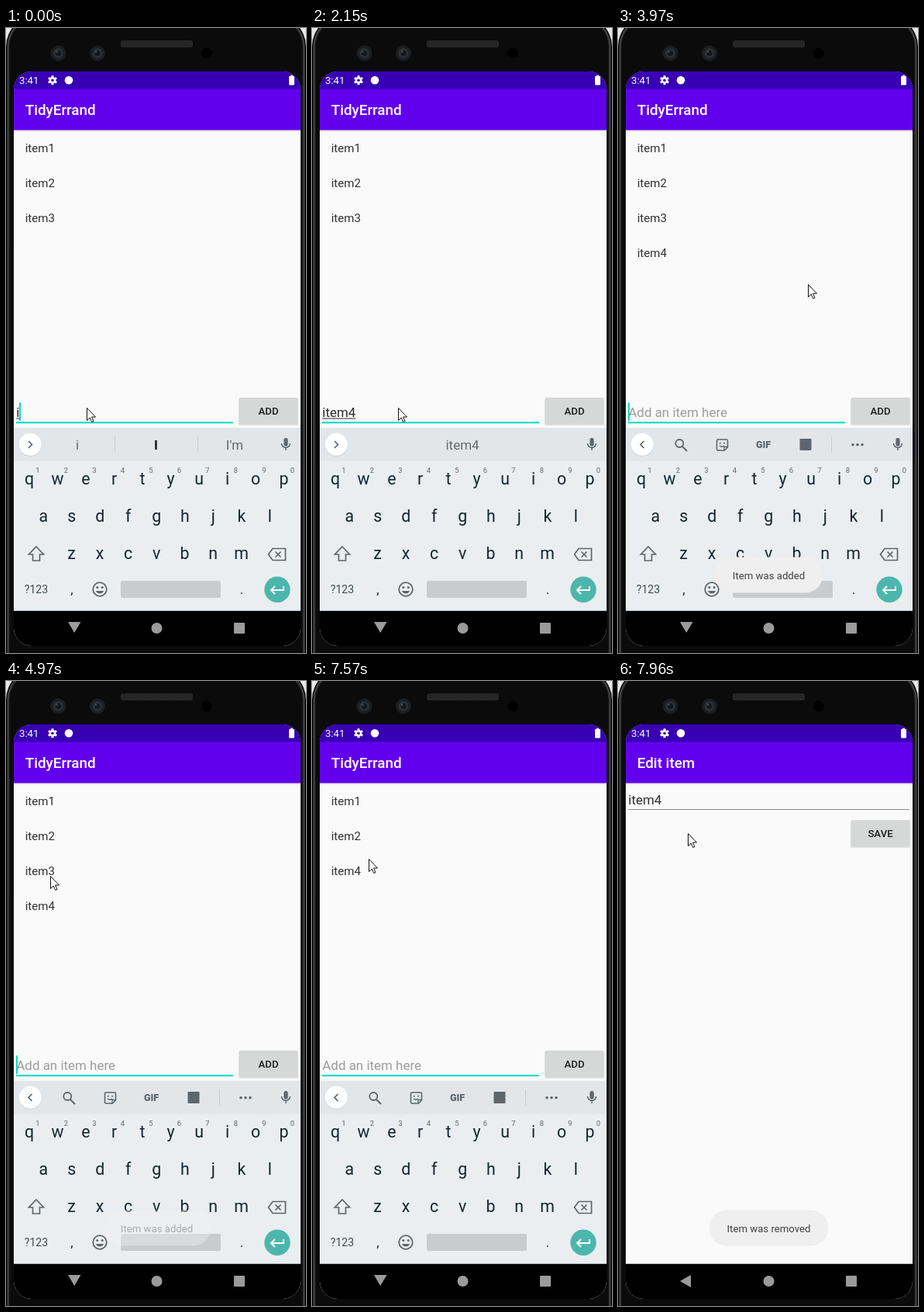
These frames come from a looping animation (387 px wide and 805 px high, 8 s). An HTML page with a canvas:

```html
<!DOCTYPE html>
<html lang="en">
<head>
<meta charset="utf-8">
<title>Task list demo</title>
<style>
  html, body { margin: 0; width: 100%; height: 100%; overflow: hidden; background: #fff; }
  canvas { display: block; width: 387px; height: 805px; }
</style>
</head>
<body>
<canvas id="stage" width="387" height="805"></canvas>
<script>
const ctx = document.getElementById('stage').getContext('2d');
const LOOP = 8000;
const TEAL = '#03dac5', INK = '#14262f', ICON = '#5c666c', GRAY = '#9b9b9b';

// Device units to stage pixels; screen edges follow from them.
const dp = n => n * 370 / 392.7;
const LEFT = 10, TOP = 56, WIDE = 370, TALL = 740;
const BAR = TOP + dp(24), BODY = BAR + dp(56), NAV = TOP + TALL - dp(48);

// Moments of the story, in ms.
const FIVE_KEYS = 1600, HINT = 1750, PRESS = 2690, ADDED = 2810, REMOVED = 6010, EDIT = 7840;

// Pointer moves: start, end, x, y.
const HOME = [104, 489];
const moves = [
  [2145, 2540, 339, 495], [3750, 3970, 245, 330], [4400, 5090, 51, 249], [6580, 6650, 91, 284],
  [6700, 7070, 54, 239], [7500, 7570, 73, 229], [7640, 7960, 90, 196]
];

const toasts = [
  { label: 'Item was added', from: ADDED, rise: 360, to: 4600, fall: 610 },
  { label: 'Item was removed', from: 5960, rise: 440, to: 7200, fall: 120 },
  { label: 'Item was removed', from: 7750, rise: 200, to: LOOP, fall: 1 }
];

const clamp = (v, lo = 0, hi = 1) => Math.min(hi, Math.max(lo, v));
const easeOut = p => 1 - (1 - p) ** 2;

function pointerAt(t) {
  let [x, y] = HOME;
  for (const [from, to, nx, ny] of moves) {
    const p = easeOut(clamp((t - from) / (to - from)));
    x += (nx - x) * p;
    y += (ny - y) * p;
  }
  return [Math.round(x), Math.round(y)];
}

function typedAt(t) {
  if (t >= ADDED) return '';
  const count = t >= FIVE_KEYS ? 5 : clamp(Math.floor((t - 40) / 120), 1, 4);
  return 'item4'.slice(0, count);
}

// The blink restarts after each burst of typing.
function caretOn(t) {
  const since = t - (t < FIVE_KEYS ? 450 : 1640);
  return Math.floor(Math.max(0, since) / 500) % 2 === 0;
}

function hintsAt(t) {
  if (t >= ADDED) return null;
  if (t >= HINT) return ['item4'];
  const w = typedAt(t).slice(0, 4);
  return [w, w[0].toUpperCase() + w.slice(1), w === 'i' ? "I'm" : w + 's'];
}

function itemsAt(t) {
  const last = t < ADDED ? 3 : 4;
  return [1, 2, 3, 4].filter(n => n <= last && !(n === 3 && t >= REMOVED)).map(n => 'item' + n);
}

function rect(x, y, w, h, color, r = 0) {
  ctx.fillStyle = color;
  ctx.beginPath();
  ctx.roundRect(x, y, w, h, r);
  ctx.fill();
}

function disc(x, y, r, color) {
  ctx.fillStyle = color;
  ctx.beginPath();
  ctx.arc(x, y, r, 0, 7);
  ctx.fill();
}

function ring(x, y, r, color, w = 1.6) {
  ctx.strokeStyle = color;
  ctx.lineWidth = w;
  ctx.beginPath();
  ctx.arc(x, y, r, 0, 7);
  ctx.stroke();
}

function line(d, color, w = 1.6, x = 0, y = 0) {
  ctx.save();
  ctx.translate(x, y);
  ctx.strokeStyle = color;
  ctx.lineWidth = w;
  ctx.stroke(new Path2D(d));
  ctx.restore();
}

function shape(d, color, x = 0, y = 0) {
  ctx.save();
  ctx.translate(x, y);
  ctx.fillStyle = color;
  ctx.fill(new Path2D(d));
  ctx.restore();
}

function setFont(size, weight = 400) {
  ctx.font = `${weight} ${size}px Roboto, Arial, sans-serif`;
}

function text(s, x, y, size, color, weight, align = 'left') {
  setFont(size, weight);
  ctx.textAlign = align;
  ctx.fillStyle = color;
  ctx.fillText(s, x, y);
}

const mid = (s, x, y, size, color, weight) => text(s, x, y, size, color, weight, 'center');

function rim(inset, color, w) {
  ctx.strokeStyle = color;
  ctx.lineWidth = w;
  ctx.beginPath();
  ctx.roundRect(inset, inset - 16, 387 - 2 * inset, 900, 40 - inset);
  ctx.stroke();
}

function phone() {
  rect(0, 0, 387, 805, '#e8e8e8');
  rect(0, -16, 387, 900, '#0b0b0c', 40);
  rim(3, '#2c2c2e', 3);
  rim(2.5, '#505052', 1);
  rect(148, 16, 93, 9, '#272728', 3);
  for (let x = 151; x < 239; x += 3)
    for (let y = 18; y < 24; y += 3) rect(x, y, 1, 1, '#1a1a1b');
  for (const x of [67.5, 118]) {
    disc(x, 32.5, 10, '#1c1e20');
    disc(x, 32.5, 6.5, '#2b3034');
    disc(x, 32.5, 3.5, '#15181b');
    disc(x - 2, 30.5, 1.2, '#4a5157');
  }
  disc(259, 32.5, 7, '#000');
}

function bars(title) {
  rect(LEFT, TOP, WIDE, TALL, '#fafafa');
  const shade = ctx.createLinearGradient(0, BODY, 0, BODY + 3);
  shade.addColorStop(0, '#dcdcdf');
  shade.addColorStop(1, '#fafafa');
  rect(LEFT, BODY - 1, WIDE, 4, shade);
  rect(LEFT, TOP, WIDE, BODY - TOP, '#6200ee');
  rect(LEFT, TOP, WIDE, BAR - TOP, '#3700b3');
  text('3:41', 17, 72, dp(14), '#fff');
  for (let i = 0; i < 6; i++) {
    ctx.save();
    ctx.translate(60, 67.3);
    ctx.rotate(i * Math.PI / 3);
    rect(-1.5, -6, 3, 4, '#fff', .5);
    ctx.restore();
  }
  ring(60, 67.3, 3.1, '#fff', 2.4);
  disc(81, 67.3, 5.3, '#fff');
  rect(365, 62, 7, 11.5, '#fff', 1);
  rect(367, 60.8, 3, 2, '#fff');
  text(title, 24.7, 112, dp(20), '#fff', 500);
}

function navBar(typing) {
  rect(LEFT, NAV, WIDE, TOP + TALL - NAV, '#000');
  shape(typing ? 'M80 765H96.500L88.200 779Z' : 'M94 765V781L80 773Z', GRAY);
  disc(194.5, 773, 7, GRAY);
  rect(294, 766, 14, 14, GRAY, 1);
}

function button(label, y, pressed) {
  rect(300, y + 1, 77, 35, '#e2e2e2', 2);
  rect(300.5, y, 76, 34.5, pressed ? '#c3c4c4' : '#d6d7d7', 2);
  mid(label, 338.5, y + 22, dp(14), '#1f1f1f', 500);
}

function mic(x, y) {
  rect(x - 2.6, y - 8, 5.2, 10.5, ICON, 2.6);
  line('M-5.500 -1A5.500 5.500 0 0 0 5.500 -1M0 4.500V8', ICON, 1.5, x, y);
}

function toolbar() {
  line('M33.500 532L29 536.500L33.500 541', ICON, 1.7);
  ring(79.3, 535, 5, ICON, 1.8);
  line('M83 539L89 545', ICON, 2);
  line('M129 530H140A1.500 1.500 0 0 1 141.500 531.500V540L137.500 544H129A1.500 1.500 0 0 1 127.500 542.500V531.500A1.500 1.500 0 0 1 129 530Z', ICON, 1.6);
  line('M141 539.500H137V544M131 538A3.700 3 0 0 0 137 538', ICON, 1.3);
  disc(131.8, 534.8, 1, ICON);
  disc(137, 534.8, 1, ICON);
  mid('GIF', 187.5, 541, 12.5, ICON, 900);
  rect(234.5, 529, 15, 15, ICON, 1);
  rect(275, 526, 1, 21, '#c9cdd0');
  for (let i = 0; i < 3; i++) disc(303 + i * 6, 536.8, 1.8, ICON);
}

function suggestions(words) {
  line('M29 532L33.500 536.500L29 541', ICON, 1.7);
  if (words.length === 1) {
    mid(words[0], 194, 542.5, dp(18), '#5f696f');
    return;
  }
  words.forEach((w, i) => {
    const best = i === 1;
    mid(w, 92 + i * 101.5, 542.5, dp(18), best ? '#121a1f' : '#5f696f', best ? 700 : 400);
  });
  for (const x of [140, 247]) rect(x, 526, 1, 21, '#c9cdd0');
}

function keyboard(words) {
  rect(LEFT, 515, WIDE, 236, '#eaeef0');
  rect(LEFT, 515, WIDE, 42.5, '#e2e6e9');
  disc(31.3, 537, 14.8, '#cfd3d6');
  disc(31.3, 536.2, 14.5, '#fff');
  if (words) suggestions(words); else toolbar();
  mic(361, 536);

  ['qwertyuiop', 'asdfghjkl', 'zxcvbnm'].forEach((keys, r) => {
    const x = 30 + r * (r + 2) * 6.1 + (r === 2 ? 5.8 : 0);
    [...keys].forEach((k, i) => mid(k, x + i * 36.5, 588 + r * 48, 21.3, INK));
  });
  [...'1234567890'].forEach((d, i) => mid(d, 41 + i * 36.5, 573, dp(10), '#5c6870'));

  line('M39 668L48.500 678H43.500V686H34.500V678H29.500Z', ICON, 1.7);
  line('M344 670.500H360.500V685.500H344L338.500 678ZM347.500 674.500L354.500 681.500M354.500 674.500L347.500 681.500', ICON, 1.7);
  mid('?123', 39, 728, dp(15), '#3f4b53');
  mid(',', 85, 729, 17, INK);
  mid('.', 304, 729, 17, INK);
  ring(121, 723, 8.8, ICON, 1.8);
  disc(117.8, 720.5, 1.5, ICON);
  disc(124.2, 720.5, 1.5, ICON);
  shape('M116 725H126A5.300 5 0 0 1 116 725Z', ICON);
  rect(148, 712, 129, 22, '#c8cccf', 2);
  disc(350, 723.3, 16.7, '#4db6ac');
  line('M358 719V724H342.500M347 719L342 724L347 729', '#fff', 2);
}

function field(value, caret) {
  const x = 13.3;
  setFont(dp(18));
  const w = ctx.measureText(value).width;
  text(value || 'Add an item here', x, 500.5, dp(18), value ? '#2a2a2a' : '#9c9c9c');
  rect(x, 502.5, w, 1, '#2a2a2a');
  rect(13, 507.3, 280, dp(2), TEAL);
  if (caret) rect(Math.floor(x + w), 482.5, 2, 23.5, TEAL);
}

function mainScreen(t) {
  bars('TidyErrand');
  itemsAt(t).forEach((s, i) => text(s, 24.7, 159.7 + i * dp(48), dp(16), '#303030'));
  field(typedAt(t), caretOn(t));
  button('ADD', 476, t >= PRESS && t < PRESS + 360);
  keyboard(hintsAt(t));
  navBar(true);
}

function editScreen() {
  bars('Edit item');
  text('item4', 13.3, 158.5, dp(18), '#2a2a2a');
  rect(13, 165, 363, 1, '#8c8c8c');
  button('SAVE', 179);
  navBar(false);
}

function toast({ label, from, rise, to, fall }, t) {
  const alpha = Math.min(clamp((t - from) / rise), clamp((to + fall - t) / fall));
  if (!alpha) return;
  setFont(dp(14));
  const w = ctx.measureText(label).width + dp(48);
  ctx.globalAlpha = alpha;
  rect(194.5 - w / 2, 681.5, w, 46, '#efefef', 22);
  mid(label, 194.5, 710, dp(14), '#424242');
  ctx.globalAlpha = 1;
}

function arrow([x, y]) {
  const d = 'M.5 .5V16.500L4.200 13L6.700 18.500L9 17.500L6.500 12H11.500Z';
  shape(d, '#fff', x, y);
  line(d, '#111', 1, x, y);
}

function draw(t) {
  phone();
  ctx.save();
  ctx.beginPath();
  ctx.roundRect(LEFT, TOP, WIDE, TALL, 23);
  ctx.clip();
  if (t < EDIT) mainScreen(t); else editScreen();
  toasts.forEach(item => toast(item, t));
  ctx.restore();
  arrow(pointerAt(t));
}

function frame() {
  draw(performance.now() % LOOP);
  requestAnimationFrame(frame);
}
frame();
</script>
</body>
</html>
```
